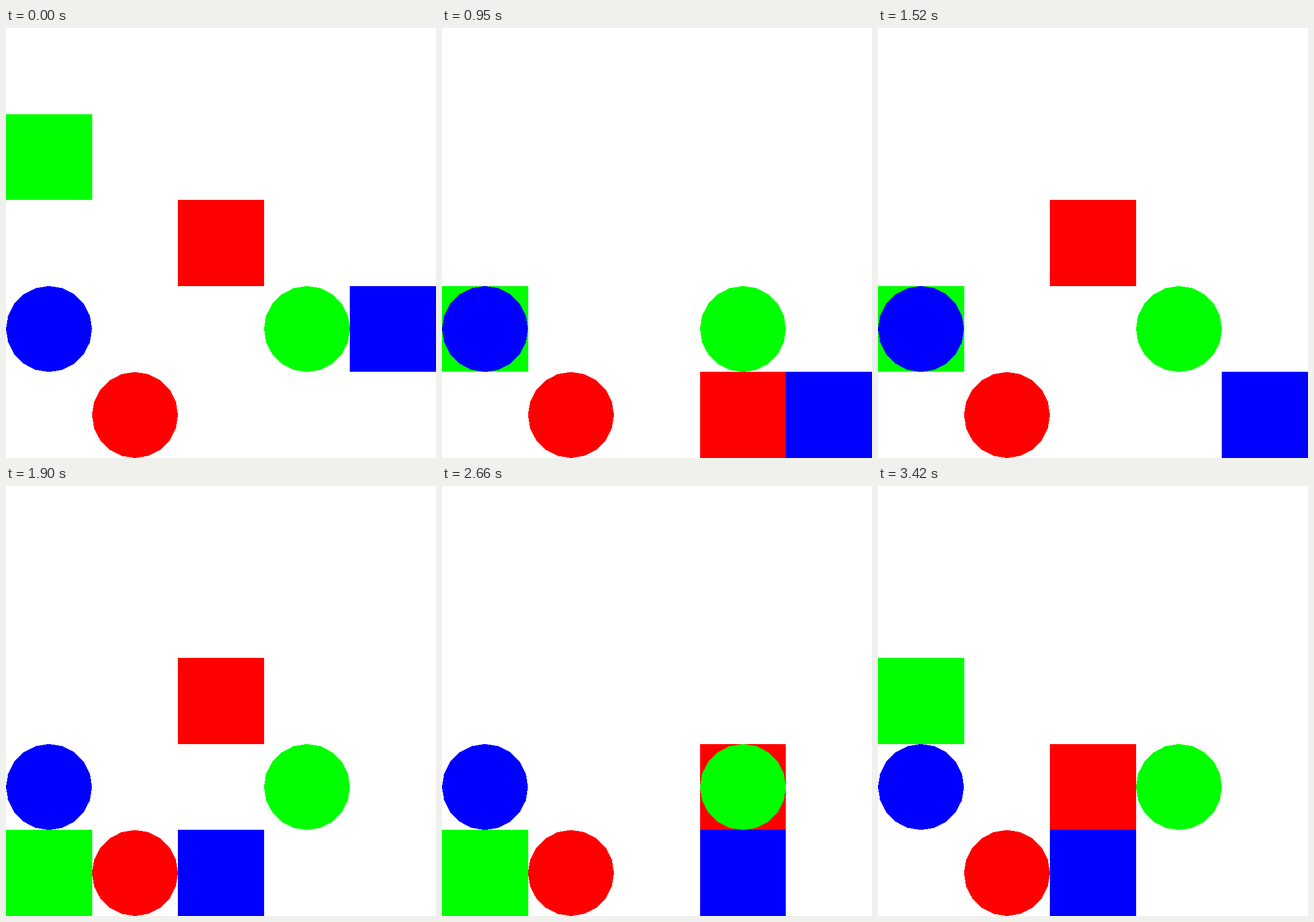
An HTML page for the animation above (3610 ms loop, 748 by 748 pixels).

```html
<!DOCTYPE html>
<html lang="en">
<head>
<meta charset="utf-8">
<title>Blocks on a grid</title>
<style>
  html, body { margin: 0; width: 100%; height: 100%; overflow: hidden; background: #fff; }
  svg { display: block; width: 100vw; height: 100vh; shape-rendering: crispEdges; }
</style>
</head>
<body>
<svg viewBox="0 0 5 5"></svg>
<script>
const STEP = 190, STEPS = 19;
const DIRS = { U: [0, -1], D: [0, 1], L: [-1, 0], R: [1, 0], '.': [0, 0] };

// start cell and one move per step
const blocks = [
  { color: '#0f0', x: 0, y: 1, moves: '...DDU.DD..RL..U.U' },
  { color: '#f00', x: 2, y: 2, moves: 'UDDRDULU...R.D.L..' },
  { color: '#00f', x: 4, y: 3, moves: '....D...LL..R..L..' }
];
const discs = [
  { color: '#00f', x: 0, y: 3 },
  { color: '#f00', x: 1, y: 4 },
  { color: '#0f0', x: 3, y: 3 }
];

const svg = document.querySelector('svg');

function add(tag, attrs) {
  const el = document.createElementNS(svg.namespaceURI, tag);
  for (const name in attrs) el.setAttribute(name, attrs[name]);
  return svg.appendChild(el);
}

// discs are 20-sided polygons
function discPoints(x, y) {
  return Array.from({ length: 20 }, (_, i) => {
    const a = i * Math.PI / 10;
    return `${x + 0.5 + Math.cos(a) / 2},${y + 0.5 + Math.sin(a) / 2}`;
  }).join(' ');
}

for (const b of blocks) b.el = add('rect', { width: 1, height: 1, fill: b.color });
for (const d of discs) add('polygon', { points: discPoints(d.x, d.y), fill: d.color });

function draw(time) {
  const step = Math.floor(time / STEP) % STEPS;
  for (const b of blocks) {
    let { x, y } = b;
    for (const m of b.moves.slice(0, step)) {
      x += DIRS[m][0];
      y += DIRS[m][1];
    }
    b.el.setAttribute('x', x);
    b.el.setAttribute('y', y);
  }
}

function tick() {
  draw(performance.now() - start);
  requestAnimationFrame(tick);
}

const start = performance.now();
tick();
</script>
</body>
</html>
```
